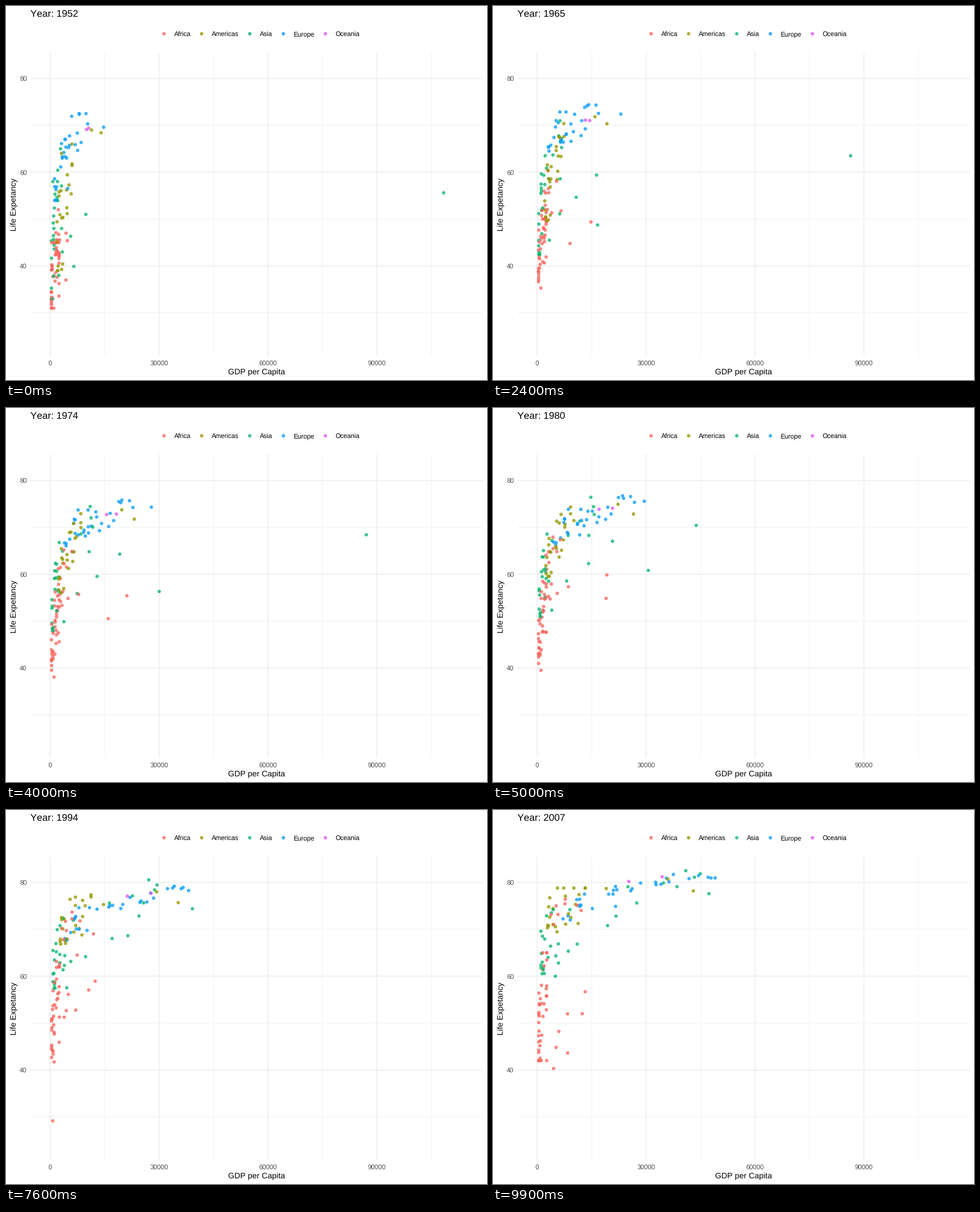
Write a matplotlib script that moves like this. It is 849x660 px and loops after 10000 ms.

```python
import numpy as np
import matplotlib.pyplot as plt
from matplotlib.animation import FuncAnimation

W, H, DPI = 849, 660, 96
PT = 72 / DPI
FRAMES = 100

plt.rcParams.update({
    "font.family": "Liberation Sans",
    "text.hinting": "none",
    "text.kerning_factor": 6,
})
COLORS = {
    "Africa": "#F8665E",
    "Americas": "#969800",
    "Asia": "#0BB66F",
    "Europe": "#0A9EF5",
    "Oceania": "#DD5AEE",
}

rng = np.random.default_rng(4)
s = np.linspace(0, 1, FRAMES)
years = 1952 + 55 * s
gdp, life, hue = [], [], []  # GDP in thousands, one path per dot


def add(region, g, l):
    gdp.append(g)
    life.append(l)
    hue.append(COLORS[region])


def path(region, *keys):
    """One dot through (year, GDP, life expectancy) key points."""
    t, g, l = zip(*keys)
    add(region, np.interp(years, t, g), np.interp(years, t, l))


def crowd(region, n, g0, g1, l0, l1, g_ease=s, l_ease=s, bump=0, jitter=.22):
    """n dots ranked from poor to rich, moving between two ranges of GDP and life."""
    def pick(u, lo, hi):
        return lo + (hi - lo) * np.clip(u + rng.normal(0, jitter), 0, 1)

    for u in np.linspace(0, 1, n):
        a = np.exp(pick(u, *np.log(g0)))
        b = np.exp(pick(u, *np.log(g1)))
        c, d = pick(u, *l0), pick(u, *l1)
        rise = bump * rng.uniform(.6, 1.3) * np.sin(np.pi * s ** 1.2)
        add(region, a + (b - a) * g_ease, c + (d - c) * l_ease + rise)


slump = s - .34 * np.exp(-((s - .77) / .1) ** 2)
plateau = np.interp(s, [0, .27, .73, 1], [0, .62, .68, 1])
early = 1 - (1 - s) ** 1.5

crowd("Africa", 36, (.32, 2.4), (.4, 2.6), (31, 45), (42, 65), s, s, 4, .35)
crowd("Africa", 7, (1.4, 2.7), (3.8, 11), (42, 52), (71, 76.4), s ** 1.4, early)
crowd("Africa", 6, (1.1, 4.7), (4.5, 12.6), (42, 47), (40, 52), s, s, 14)
crowd("Americas", 22, (1.8, 6), (2.8, 13.2), (39, 66), (68, 78.8), s ** 1.2, early)
crowd("Americas", 2, (3.1, 11.4), (19, 36), (64, 69), (78.7, 80.7), s ** 1.2, s, 0, 0)
crowd("Asia", 21, (.35, 2), (1, 9), (33, 58), (60, 74.2), s ** 1.8, early, 0, .28)
crowd("Asia", 6, (1, 4.1), (25, 47), (48, 65), (78.5, 82.5), s ** 1.7, early)
crowd("Asia", 4, (2, 9.8), (5, 29), (38, 51), (60, 75.6), s ** .7, early, 0, .1)
crowd("Europe", 16, (3.1, 10.3), (21, 49), (63, 72.5), (78.2, 81.6), s ** 1.25, s ** 1.1, 0, .15)
crowd("Europe", 13, (1.2, 6.9), (6, 24), (54, 67), (72, 77.5), slump, plateau)
crowd("Oceania", 2, (10, 10.6), (34.4, 25.2), (69.1, 69.4), (81.2, 80.2), s ** 1.2, s ** 1.3, 0, 0)

path("Asia", (1952, 108.4, 55.6), (1957, 113.5, 58), (1967, 80.9, 64.6),
     (1972, 109.3, 67.7), (1977, 59.3, 69.3), (1982, 31.4, 71.3), (2007, 47.3, 77.6))
path("Asia", (1952, 6.5, 39.9), (1962, 11.6, 45.9), (1977, 34.2, 58.7),
     (1987, 21.2, 66.3), (2007, 21.7, 72.8))
path("Africa", (1952, 2.4, 42.7), (1962, 6.8, 47.8), (1967, 18.8, 50.2),
     (1977, 22, 57.4), (1987, 11.8, 66.2), (2007, 12.1, 74))
path("Africa", (1952, 4.3, 37), (1972, 11.4, 48.7), (1977, 21.7, 52.8),
     (1987, 11.9, 60.2), (2007, 13.2, 56.7))
path("Africa", (1952, .5, 40), (1987, .85, 44), (1992, .74, 23.6),
     (1997, .6, 36.1), (2007, .86, 46.2))
path("Americas", (1952, 14, 68.4), (1972, 21.8, 71.3), (2007, 43, 78.2))
path("Europe", (1952, 14.7, 69.6), (1972, 27.2, 73.8), (2007, 37.5, 81.7))


def px(thousands):
    return 78.1 + 6.4067 * np.asarray(thousands)


def py(age):
    return 127.8 + (80 - np.asarray(age)) * 8.275


order = rng.permutation(len(hue))
X, Y = px(gdp)[order], py(life)[order]
hue = [hue[i] for i in order]

fig = plt.figure(figsize=(W / DPI, H / DPI), dpi=DPI, facecolor="white")
ax = fig.add_axes([0, 0, 1, 1])
ax.set_xlim(0, W)
ax.set_ylim(H, 0)
ax.axis("off")


def label(x, y, text, size, color="black", ha="left", **kw):
    return ax.text(x, y, text, fontsize=size * PT, color=color, ha=ha, va="baseline", **kw)


def grid(xs, ys, width):
    style = dict(color="#EBEBEB", lw=width * PT, snap=False, solid_capstyle="butt", zorder=1)
    for x in xs:
        ax.plot([x, x], [82, 618], **style)
    for y in ys:
        ax.plot([43.3, 841.7], [y, y], **style)


def dots(x, y, colors):
    return ax.scatter(x, y, s=(5.1 * PT) ** 2, c=colors, edgecolors=colors,
                      linewidths=.92 * PT, alpha=.75, zorder=3)


grid(px([15, 45, 75, 105]), py([70, 50, 30]), .7)
grid(px([0, 30, 60, 90]), py([80, 60, 40]), 1.4)

for v in (0, 30, 60, 90):
    label(px(v), 633.6, str(v * 1000), 11.5, "#4D4D4D", "center")
for v in (40, 60, 80):
    label(37, py(v) + 4.2, str(v), 11.5, "#4D4D4D", "right")
label(442.5, 650.5, "GDP per Capita", 14.3, ha="center")
label(18, 350, "Life Expetancy", 14.3, ha="center", rotation=90, rotation_mode="anchor")

keys = (279, 345.3, 430.3, 489.6, 563.8)
dots(keys, [49] * 5, list(COLORS.values()))
for x, name in zip(keys, COLORS):
    label(x + 17.9, 53.1, name, 11.5)

title = label(43, 20, "Year: 1952", 17.2)
points = dots(X[:, 0], Y[:, 0], hue)


def update(i):
    points.set_offsets(np.column_stack([X[:, i], Y[:, i]]))
    title.set_text(f"Year: {round(years[i])}")
    return points, title


anim = FuncAnimation(fig, update, frames=FRAMES, interval=100, repeat=True)
plt.show()
```
